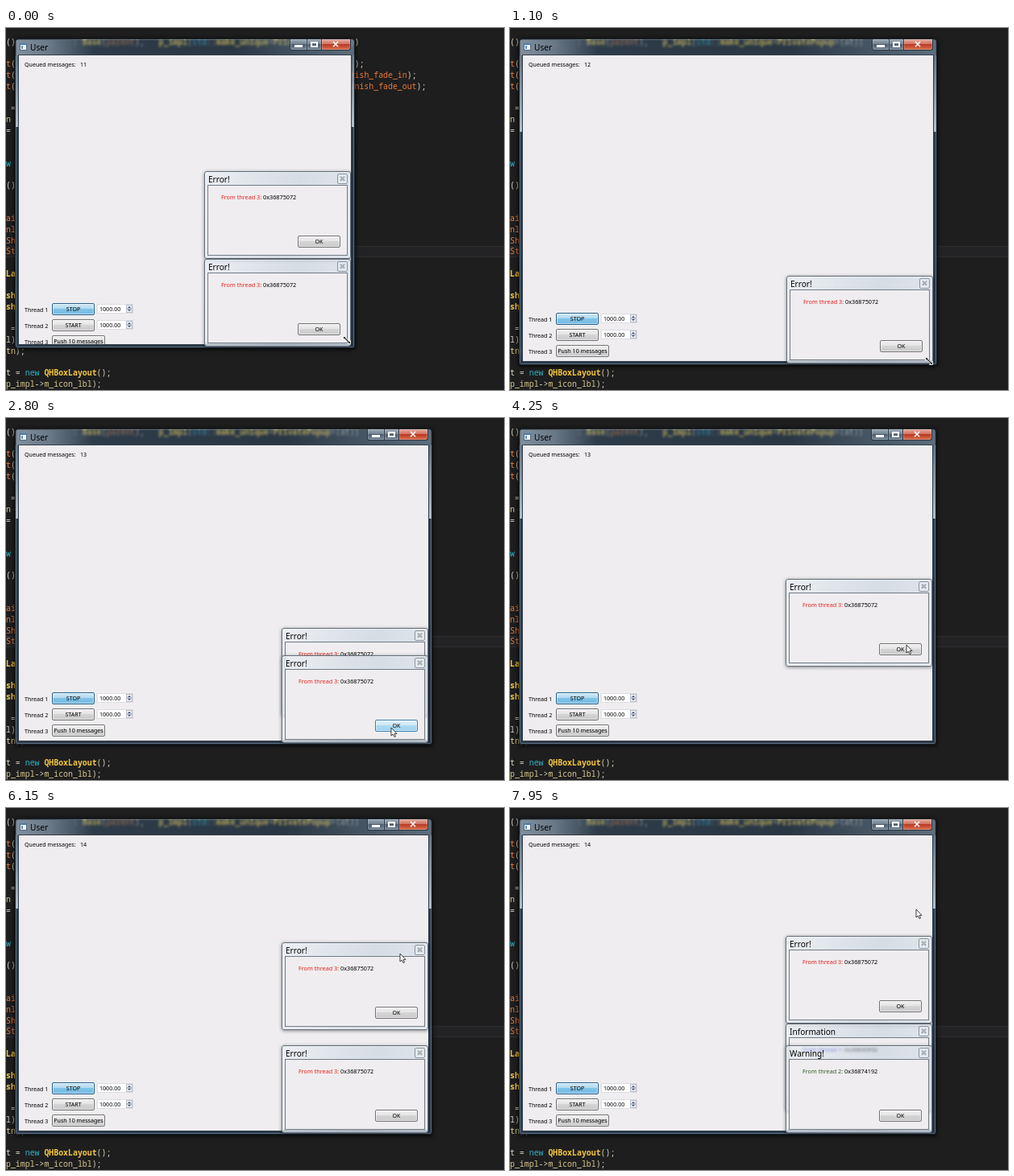
An HTML page that plays this animation: 618x450 px, repeating every 8 s.

```html
<!DOCTYPE html>
<html lang="en">
<head>
<meta charset="utf-8">
<title>Popup queue</title>
<style>
html, body { margin: 0; width: 100%; height: 100%; overflow: hidden; background: #1e1e1f; }
#stage { position: relative; width: 618px; height: 450px; overflow: hidden; background: #1e1e1f;
  font: 7.1px/10px "Noto Sans", "Open Sans", sans-serif; color: #000; white-space: pre; }
#stage * { position: absolute; box-sizing: border-box; }
#stage span span, .flow { position: static !important; }
.code { font: 500 9.9px/14px "Noto Sans Mono", "DejaVu Sans Mono", monospace; }
.o { color: #e87a35; } .y { color: #f2c53d; } .c { color: #2fb3c6; } .w { color: #d8d2bd; } .p { color: #d9c98a; }
.y { font-weight: 600; }
.current { left: 0; top: 271px; width: 618px; height: 14px; background: #232325; border: solid #2d2d30; border-width: 1px 0; }

#win { left: 11px; top: 13px; border: 1px solid #18222c; border-radius: 4px 4px 3px 3px;
  backdrop-filter: blur(1.5px) brightness(1.3); box-shadow: 0 1px 5px 1px rgba(0,0,0,.7), inset 0 0 0 1px rgba(170,192,212,.4);
  background: linear-gradient(transparent 20px, rgba(130,152,174,.6) 20px, rgba(205,219,231,.85) 28.5%, rgba(44,60,78,.85) 28.5%); }
.bar { left: 1px; right: 1px; top: 1px; height: 19px;
  background: linear-gradient(90deg, rgba(150,170,188,.8), rgba(128,148,167,.75) 42px, rgba(52,78,102,.55) 95px, rgba(44,70,96,.5) 65%, rgba(112,134,154,.75)); }
.title { font-size: 10.1px; line-height: 14px; }
.icon { left: 5px; top: 5px; width: 9px; height: 9px; background: #f4f7fa; border: 1px solid #53677c; border-top: 2px solid #4a7db0; }
.icon i { left: 1px; top: 1px; width: 2px; height: 4px; background: #5b92c4; }
.sys { top: 0; height: 14px; border: 1px solid #2b3844; border-top: 0; background: linear-gradient(#9aa8b5, #71818f 48%, #4c5d6d 50%, #75889a);
  box-shadow: inset 0 0 0 1px rgba(255,255,255,.2); }
.min { right: 58px; width: 22px; border-radius: 0 0 0 3px; }
.max { right: 40px; width: 19px; }
.close { right: 4px; width: 37px; border-radius: 0 0 3px 0; background: linear-gradient(#e3aa9e, #d0705e 48%, #bb3a25 50%, #d9704f); }
.min i { left: 5px; top: 7px; width: 10px; height: 3px; background: #fff; }
.max i { left: 4px; top: 3px; width: 9px; height: 7px; border: 2px solid #fff; }
.close b { left: 12px; top: -1px; color: #fff; font: bold 12px/14px "DejaVu Sans", sans-serif; }
#client { left: 4px; right: 4px; top: 20px; bottom: 4px; overflow: hidden; background: #efedef; outline: 1px solid #33404d; }
#rows { left: 0; top: 0; }

.btn { height: 15px; line-height: 13px; text-align: center; border: 1px solid #757575; border-radius: 2px;
  background: linear-gradient(#f0f0f0, #e4e4e4 48%, #d5d5d6 50%, #c9c9cb); box-shadow: inset 0 0 0 1px rgba(255,255,255,.5); }
.btn.hot { border-color: #3c7fb1; background: linear-gradient(#e0f1fb, #cde8f8 48%, #aedaf3 50%, #9dd0ee); }
.btn.on { border-color: #2c628b; background: linear-gradient(#cfe7f5, #b0d9f0 48%, #80c3e8 50%, #74bbe2); }
.spin { left: 97px; width: 45px; height: 12px; line-height: 10px; padding-left: 2px; background: #fff; border: 1px solid #dcdce2; }
.spin i { right: 0; width: 8px; height: 5px; background: #eceef2; border: 1px solid #b9bec8; }
.spin i::after { content: ""; position: absolute; left: 1px; top: 0; border: 2px solid transparent; border-bottom-color: #3b4f78; margin-top: -1px; }
.spin i + i { transform: scaleY(-1); }

.popup { width: 182px; height: 109px; border: 1px solid #626d78; border-radius: 3px; backdrop-filter: blur(1.5px);
  background: linear-gradient(100deg, rgba(232,239,245,.55), rgba(190,204,218,.5) 60%, rgba(214,225,235,.5));
  box-shadow: 0 1px 4px rgba(0,0,0,.45), inset 0 0 0 1px rgba(255,255,255,.45); }
.popup .title { left: 4px; top: 2px; }
.body { left: 3px; right: 3px; top: 16px; bottom: 3px; background: #efedef; border: 1px solid #717b85; }
.x { right: 3px; top: 2px; width: 13px; height: 13px; border: 1px solid #8a949e; border-radius: 2px; background: #e4e9ee; }
.x b { left: 0; width: 11px; text-align: center; color: #fff; font: bold 9px/11px "DejaVu Sans", sans-serif; -webkit-text-stroke: .6px #78838e; }
.msg { left: 16px; top: 9px; font-size: 7.25px; }
.ok { left: 111px; top: 62px; width: 53px; }
.cursor { left: 0; top: 0; overflow: visible; width: 1px; height: 1px; }
</style>
</head>
<body>
<div id="stage"></div>
<script>
const LOOP = 8000, SLOT = 109, RISE = 980, FADE = 130;

const codeLines = [ // row, column, segments led by a colour letter
  [0, 0, 'w()'], [0, 32, 'yp_impl|w(|cstd|w::|ymake_unique|w<|yPrivatePopup|w>(at))'], [0, 14, 'w: |yBase|w(|oparent|w), '],
  [2, 0, 'ot|w('], [2, 73, 'w);'], [3, 0, 'ot|w('], [3, 70, 'ofinish_fade_in|w);'],
  [4, 0, 'ot|w('], [4, 71, 'ofinish_fade_out|w);'], [6, 0, 'w ='], [7, 0, 'pn'], [8, 0, 'w='],
  [11, 0, 'cw'], [13, 0, 'w()'], [16, 0, 'oai'], [17, 0, 'onl'], [18, 0, 'oSh'], [19, 0, 'oSt'],
  [21, 0, 'yLa'], [23, 0, 'ysh'], [24, 0, 'ysh'], [26, -1, 'wt = |cnew |yQHBoxLayout|w();'],
  [27, 0, 'wl);'], [28, 0, 'ptn|w);'], [30, 0, 'wt = |cnew |yQHBoxLayout|w();'],
  [31, 0, 'pp_impl|w->|pm_icon_lbl|w);']
];

const corner = [ // time, right, bottom
  [-60, 428, 406], [0, 432, 397], [150, 470, 388], [400, 586, 420], [600, 590, 437], [850, 565, 436],
  [1000, 530, 418], [1200, 528, 418], [1350, 540, 434], [1600, 582, 400], [1800, 588, 356],
  [1940, 588, 364], [2000, 588, 372], [2080, 584, 383], [2250, 558, 394], [2450, 528, 405]
];
const pointer = [ // time, x, y
  [2450, 520, 397], [2600, 480, 385], [2850, 478, 385], [3150, 486, 312], [3400, 486, 350], [3800, 484, 384],
  [3950, 484, 384], [4250, 492, 282], [4900, 492, 382], [5600, 486, 384], [6150, 489, 181],
  [6450, 512, 140], [6700, 504, 126]
];
const counts = [[0, 11], [780, 12], [1645, 13], [4300, 14], [5120, 13], [5980, 14], [6500, 13], [6860, 14], [7450, 13], [7720, 14]];

const error = ['Error!', '#e8211d', 3, '0x36875072'];
const info = ['Information', '#2525e0', 1, '0x36840952'];
const warning = ['Warning!', '#2f5a22', 2, '0x36874192'];
const popups = [ // kind, shown, closed, times of being pushed up
  [error, -999, 450, [-2000]], [error, -999, 3130, [2495]], [error, 2495, 4260, [3395]],
  [error, 3395, 3950, []], [error, 4290, 6450, [5000, 5980]], [error, 5110, 5650, []],
  [error, 5980, 9999, [6850, 7705]], [info, 6850, 9999, [7705]], [warning, 7705, 9999, []]
].map(([kind, shown, closed, pushes]) => ({ kind, shown, closed, pushes }));

const stage = document.getElementById('stage');
const clamp = v => Math.max(0, Math.min(1, v));

function add(html, parent = stage) {
  parent.insertAdjacentHTML('beforeend', html);
  return parent.lastElementChild;
}
function track(keys, t) {
  const i = keys.findIndex(k => k[0] > t);
  if (i < 0) return keys[keys.length - 1].slice(1);
  if (i === 0) return keys[0].slice(1);
  const [a, b] = [keys[i - 1], keys[i]], f = (t - a[0]) / (b[0] - a[0]);
  return [1, 2].map(n => a[n] + (b[n] - a[n]) * f);
}
const move = (el, x, y) => { el.style.transform = `translate(${Math.round(x)}px,${Math.round(y)}px)`; };

add('<div class="current"></div>');
for (const [row, col, text] of codeLines) {
  const parts = text.split('|').map(s => `<span class="${s[0]}">${s.slice(1).replace('<', '&lt;')}</span>`);
  add(`<span class="code" style="left:${col}ch;top:${Math.round(10 + row * 13.7)}px">${parts.join('')}</span>`);
}

const spin = y => `<div class="spin" style="top:${y + 1}px">1000.00<i style="top:0"></i><i style="top:5px"></i></div>`;
const row = (n, y, width, label, cls = '') => `<div style="left:7px;top:${y + 3}px">Thread ${n}</div>
  <div class="btn ${cls}" style="left:41px;top:${y}px;width:${width}px">${label}</div>`;
const win = add(`<div id="win"><div class="bar"></div><div class="icon"><i></i></div>
  <div class="title" style="left:18px;top:3px">User</div>
  <div class="sys min"><i></i></div><div class="sys max"><i></i></div><div class="sys close"><b>×</b></div>
  <div id="client"><div style="left:7px;top:6px">Queued messages:</div><div id="count" style="left:76px;top:6px"></div>
  <div id="rows">${row(1, 0, 53, 'STOP', 'on')}${spin(0)}${row(2, 20, 53, 'START')}${spin(20)}${row(3, 40, 66, 'Push 10 messages')}</div>
  </div></div>`);
const count = document.getElementById('count'), rows = document.getElementById('rows');

for (const p of popups) {
  const [title, color, thread, value] = p.kind;
  p.el = add(`<div class="popup"><div class="title">${title}</div><div class="x"><b>×</b></div>
    <div class="body"><div class="msg"><span class="flow" style="color:${color}">From thread ${thread}:</span> ${value}</div>
    <div class="btn ok">OK</div></div></div>`);
  p.ok = p.el.querySelector('.ok');
}

const arrow = add(`<svg class="cursor"><path d="M0 0V10L2.3 8 4 11.5 5.6 10.8 4 7.4H7Z" fill="#fff" stroke="#111" stroke-width=".8"/></svg>`);
const sizer = add(`<svg class="cursor"><path d="M-4.5-4.5H-.5L-1.8-3.1 3.1 1.8 4.5.5V4.5H.5L1.8 3.1-3.1-1.8-4.5-.5Z" fill="#111" stroke="#fff" stroke-width=".9"/></svg>`);

function draw(t) {
  const [right, bottom] = track(corner, t).map(Math.round);
  win.style.width = right - 10 + 'px';
  win.style.height = bottom - 12 + 'px';
  // The form's layout trails the frame while it is being resized.
  move(rows, 0, track(corner, t - 60)[1] - 98);
  count.textContent = counts.filter(c => c[0] <= t).pop()[1];

  const [hx, hy] = track(pointer, t - 120);
  for (const p of popups) {
    const alpha = Math.min(clamp((t - p.shown) / FADE), clamp(1 - (t - p.closed) / FADE));
    const lift = p.pushes.reduce((sum, at) => sum + SLOT * clamp((t - at) / RISE), 0);
    const x = right - 186, y = Math.round(bottom - 110 - lift);
    p.el.style.display = alpha > 0 ? '' : 'none';
    p.el.style.opacity = alpha;
    p.el.style.left = x + 'px';
    p.el.style.top = y + 'px';
    p.ok.classList.toggle('hot', t > 2500 && hx > x + 116 && hx < x + 169 && hy > y + 80 && hy < y + 95);
  }

  const resizing = t < 2450;
  arrow.style.display = resizing ? 'none' : '';
  sizer.style.display = resizing ? '' : 'none';
  move(arrow, ...track(pointer, t));
  move(sizer, right - 9, track(corner, t + 80)[1] - 4);
}

const start = performance.now();
function tick() {
  draw((performance.now() - start) % LOOP);
  requestAnimationFrame(tick);
}
draw(0);
requestAnimationFrame(tick);
</script>
</body>
</html>
```
